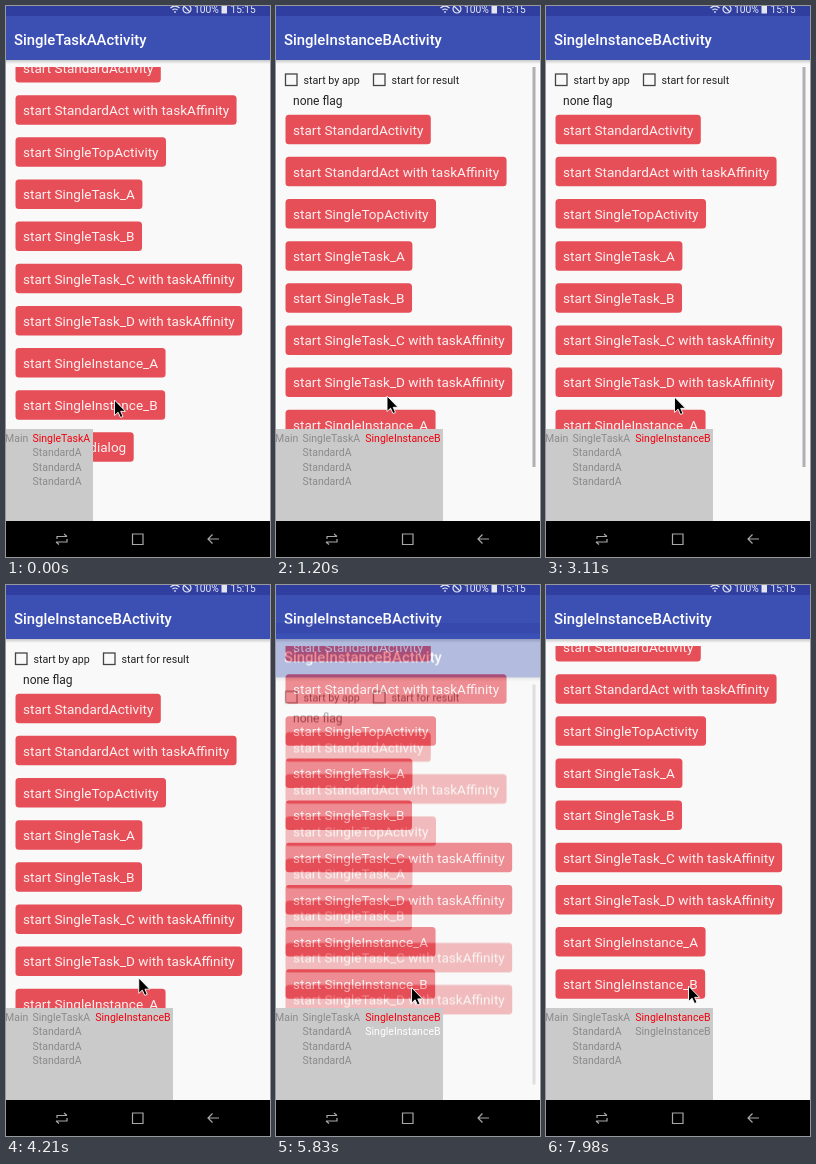
An HTML page with a canvas for the animation above (8 s loop, 264 px wide and 551 px high).

```html
<!DOCTYPE html>
<html lang="en">
<head>
<meta charset="utf-8">
<title>Activity launch modes</title>
<style>
  html, body { margin: 0; width: 100%; height: 100%; overflow: hidden; background: #000; }
  canvas { display: block; width: 100vw; height: 100vh; }
</style>
</head>
<body>
<canvas id="stage" width="264" height="551"></canvas>
<script>
const W = 264, H = 551, LOOP = 8000;
const screen = document.getElementById('stage').getContext('2d');
const layer = document.createElement('canvas');
layer.width = W;
layer.height = H;
const win = layer.getContext('2d');

const BUTTONS = ['StandardActivity', 'StandardAct with taskAffinity', 'SingleTopActivity',
  'SingleTask_A', 'SingleTask_B', 'SingleTask_C with taskAffinity',
  'SingleTask_D with taskAffinity', 'SingleInstance_A', 'SingleInstance_B']
  .map(name => 'start ' + name).concat('show alert dialog');
const SCROLL_MAX = 61.7, NAV_TOP = 515;

// Key points: [time, value, ...]
const SCROLL = [[2050, 0], [2450, 1], [2720, 1], [3020, 0], [4520, 0], [4960, 1]];
const SCROLL_LAST = [[6560, 0], [7020, 1]];
const BAR_ALPHA = [[1500, 1], [1750, 0], [2000, 0], [2050, 1], [3400, 1], [3650, 0],
  [4470, 0], [4520, 1], [5280, 1], [5420, 0]];
const BAR_ALPHA_LAST = [[7320, 1], [7580, 0]];
const CURSOR = [[0, 108.5, 394], [60, 106.5, 393.5], [720, 106.5, 393.5], [1200, 111, 390],
  [2000, 115, 391], [3110, 128.5, 391], [4400, 133, 393], [5080, 135.5, 394.5],
  [5650, 136, 395], [6300, 133.5, 435], [6480, 133.5, 435], [7000, 140, 410], [7980, 142.5, 401]];
const OPEN_B = [460, 980], REOPEN_B = [5620, 6140];

const smooth = x => x * x * (3 - 2 * x);
const clamp = x => Math.min(1, Math.max(0, x));
const progress = (t, [start, end]) => smooth(clamp((t - start) / (end - start)));

function track(keys, t, column = 1) {
  const next = keys.findIndex(key => key[0] > t);
  if (next === 0) return keys[0][column];
  if (next < 0) return keys[keys.length - 1][column];
  const a = keys[next - 1], b = keys[next];
  return a[column] + (b[column] - a[column]) * smooth((t - a[0]) / (b[0] - a[0]));
}

function text(c, str, x, middle, size, color, weight = 400) {
  c.font = `${weight} ${size}px Roboto, sans-serif`;
  c.fillStyle = color;
  c.fillText(str, x, middle + size * 0.355);
}

function rect(c, x, y, w, h, color, radius = 0) {
  c.fillStyle = color;
  c.beginPath();
  c.roundRect(x, y, w, h, radius);
  c.fill();
}

function path(c, d, color, width = 1.2) {
  c.strokeStyle = color;
  c.lineWidth = width;
  c.stroke(new Path2D(d));
}

function checkbox(x, label) {
  win.strokeStyle = '#444';
  win.lineWidth = 1.3;
  win.strokeRect(x + 0.5, 68, 11.5, 11.5);
  text(win, label, x + 18.5, 74, 10.7, '#222');
}

// Renders one activity into the off-screen layer.
function drawWindow(title, scroll, barAlpha) {
  win.clearRect(0, 0, W, H);
  rect(win, 0, 0, W, NAV_TOP, '#f8f9f8');
  rect(win, 0, 0, W, 10, '#303f9f');
  rect(win, 0, 10, W, 44, '#3c50b4');
  const shadow = win.createLinearGradient(0, 54, 0, 58);
  shadow.addColorStop(0, 'rgba(0,0,0,.2)');
  shadow.addColorStop(1, 'rgba(0,0,0,0)');
  rect(win, 0, 54, W, 4, shadow);
  text(win, title, 8, 34, 14.9, '#fff', 500);

  win.save();
  win.beginPath();
  win.rect(0, 61, W, NAV_TOP - 61);
  win.clip();
  win.translate(0, -scroll * SCROLL_MAX);
  checkbox(9, 'start by app');
  checkbox(97, 'start for result');
  text(win, 'none flag', 17, 94.5, 12, '#222');
  BUTTONS.forEach((label, i) => {
    const y = 123.7 + i * 42.15;
    win.font = '400 13.55px Roboto, sans-serif';
    rect(win, 9.5, y - 15, win.measureText(label).width + 15, 29.5, '#e74f58', 3.5);
    text(win, label, 17, y, 13.55, '#fdf0f0');
  });
  win.restore();

  win.globalAlpha = barAlpha;
  rect(win, 256.5, 61 + scroll * 46.5, 3, 400, '#b0b0b3');
  win.globalAlpha = 1;
}

function placeWindow(scale, dy, alpha) {
  screen.save();
  screen.globalAlpha = alpha;
  screen.translate(W / 2, H / 2 + dy);
  screen.scale(scale, scale);
  screen.drawImage(layer, -W / 2, -H / 2);
  screen.restore();
}

function drawWindows(t) {
  const opening = progress(t, OPEN_B), reopening = progress(t, REOPEN_B);
  if (opening < 1) {
    if (opening > 0) {
      rect(screen, 0, 0, W, 54, '#26327c');
      rect(screen, 0, 54, W, 448, '#555');
    }
    drawWindow('SingleTaskAActivity', 1, 0);
    placeWindow(1 - 0.1 * opening, 0, 1);
  }
  if (opening > 0 && reopening < 1) {
    drawWindow('SingleInstanceBActivity', track(SCROLL, t), track(BAR_ALPHA, t));
    placeWindow(0.95 + 0.05 * opening, 60 * (1 - opening), opening);
  }
  if (reopening > 0) {
    screen.save();
    screen.beginPath();
    screen.rect(0, 0, W, NAV_TOP);
    screen.clip();
    drawWindow('SingleInstanceBActivity', track(SCROLL_LAST, t), track(BAR_ALPHA_LAST, t));
    placeWindow(1, 60 * (1 - reopening), reopening);
    screen.restore();
  }
}

function drawSystemBars() {
  const light = '#e4e6f2', nav = '#a8a8a8';
  path(screen, 'M164.5 2Q169 -2 173.5 2M166.5 4Q169 2 171.5 4M169 5V7', light);
  path(screen, 'M177 3a4 4 0 1 0 8 0a4 4 0 1 0 -8 0M178 0L184 6', light);
  text(screen, '100%', 188, 3.6, 10.3, light);
  rect(screen, 215.5, 0, 5.5, 7.5, light);
  text(screen, '15:15', 224.5, 3.6, 10.1, light);
  path(screen, 'M61 530.5H51V533M58 528L61 530.5M50 536H61V533M53 538.5L50 536', nav);
  path(screen, 'M126.5 528H137V538.5H126.5Z', nav);
  path(screen, 'M213 533H202M206.5 528.5L202 533L206.5 537.5', nav);
}

function drawStackPanel(t) {
  const gray = '#8b8b8b', red = '#f3000c';
  const opened = t >= OPEN_B[0], reopened = t >= REOPEN_B[0];
  const leaving = (span) => t < span[1] ? '#fff' : gray;
  const entry = (str, x, row, color) => text(screen, str, x, 432.3 + row * 14.3, 10.5, color);
  rect(screen, 0, 423, opened ? 167 : 87, NAV_TOP - 423, '#cacaca');
  entry('Main', -1, 0, gray);
  entry('SingleTaskA', 26.5, 0, opened ? leaving(OPEN_B) : red);
  for (let row = 1; row < 4; row++) entry('StandardA', 26.5, row, gray);
  if (opened) entry('SingleInstanceB', 89.3, 0, red);
  if (reopened) entry('SingleInstanceB', 89.3, 1, leaving(REOPEN_B));
}

function drawCursor(t) {
  screen.save();
  screen.translate(track(CURSOR, t, 1), track(CURSOR, t, 2));
  const arrow = new Path2D('M0 0V15.5L3.6 12.2L6 17.5L8.5 16.4L6.2 11.3H11Z');
  screen.fillStyle = '#000';
  screen.fill(arrow);
  screen.strokeStyle = '#fff';
  screen.lineWidth = 0.9;
  screen.stroke(arrow);
  screen.restore();
}

function frame() {
  const t = performance.now() % LOOP;
  rect(screen, 0, 0, W, H, '#000');
  drawWindows(t);
  drawSystemBars();
  drawStackPanel(t);
  drawCursor(t);
  requestAnimationFrame(frame);
}
frame();
</script>
</body>
</html>
```
